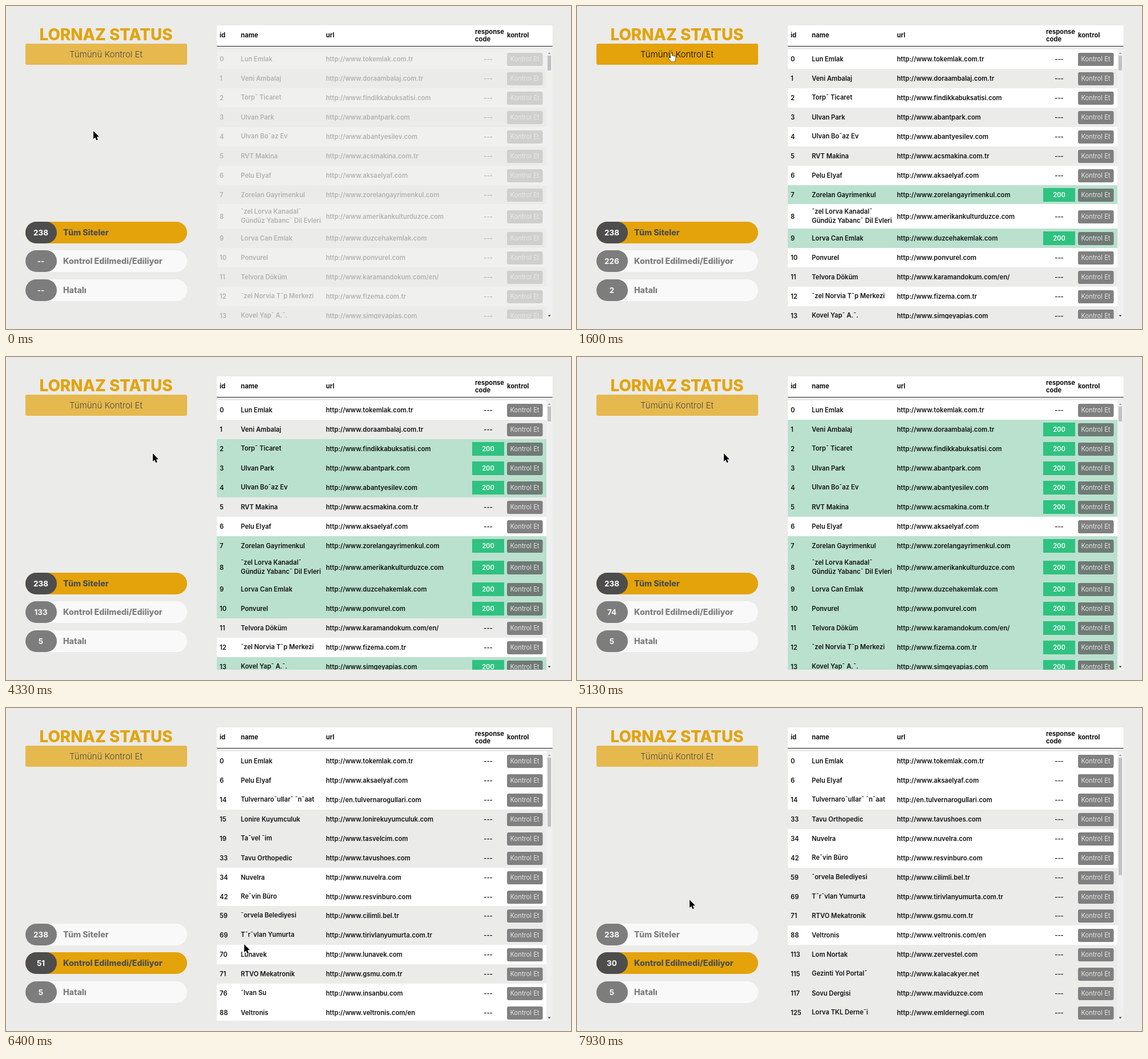
Write an HTML page with a canvas that moves like this. It is 989 px wide and 566 px high and loops after 8 s.

```html
<!DOCTYPE html>
<html lang="tr">
<head>
<meta charset="utf-8">
<title>Status</title>
<style>
  html, body { margin: 0; height: 100%; overflow: hidden; background: #ebebea; }
  canvas { display: block; }
</style>
</head>
<body>
<canvas id="stage" width="989" height="566"></canvas>
<script>
const ctx = document.getElementById('stage').getContext('2d');
const BG = '#ebebea', GOLD = '#e4a30a', DARK = '#4d4d4d';
const LOOP = 8000, FPS = 15, START_AT = 1330, FILTER_AT = 5800;
const TOTAL = 238, ROW = 33.9, TALL_ROW = 42.5;

// id | name | address
const sites = `0|Lun Emlak|www.tokemlak.com.tr
1|Veni Ambalaj|www.doraambalaj.com.tr
2|Torp¯ Ticaret|www.findikkabuksatisi.com
3|Ulvan Park|www.abantpark.com
4|Ulvan Bo¯az Ev|www.abantyesilev.com
5|RVT Makina|www.acsmakina.com.tr
6|Pelu Elyaf|www.aksaelyaf.com
7|Zorelan Gayrimenkul|www.zorelangayrimenkul.com
8|¯zel Lorva Kanadal¯/Gündüz Yabanc¯ Dil Evleri|www.amerikankulturduzce.com
9|Lorva Can Emlak|www.duzcehakemlak.com
10|Ponvurel|www.ponvurel.com
11|Telvora Döküm|www.karamandokum.com/en/
12|¯zel Norvia T¯p Merkezi|www.fizema.com.tr
13|Kovel Yap¯ A.¯.|www.simgeyapias.com
14|Tulvernaro¯ullar¯ ¯n¯aat|en.tulvernarogullari.com
15|Lonire Kuyumculuk|www.lonirekuyumculuk.com
19|Ta¯vel ¯im|www.tasvelcim.com
33|Tavu Orthopedic|www.tavushoes.com
34|Nuvelra|www.nuvelra.com
42|Re¯vin Büro|www.resvinburo.com
59|¯orvela Belediyesi|www.cilimli.bel.tr
69|T¯r¯vlan Yumurta|www.tirivlanyumurta.com.tr
70|Lunavek|www.lunavek.com
71|RTVO Mekatronik|www.gsmu.com.tr
76|¯lvan Su|www.insanbu.com
88|Veltronis|www.veltronis.com/en
113|Lom Nortak|www.zervestel.com
114|Lorva OSB|www.duzceosb.org.tr
115|Gezinti Yol Portal¯|www.kalacakyer.net
117|Sovu Dergisi|www.maviduzce.com
125|Lorva TKL Derne¯i|www.emldernegi.com`.split('\n').map(line => {
  const [id, name, url] = line.split('|');
  return { id: +id, lines: name.split('/'), url: 'http://' + url, limit: 0 };
});

// A site is done once the waiting counter has dropped to its limit.
const finishInOrder = (ids, first, gap) =>
  ids.forEach((id, k) => { sites.find(site => site.id === id).limit = first - gap * k; });
finishInOrder([7, 9, 2, 10, 13, 3, 4, 8, 1, 5, 12, 11], 240, 14);
finishInOrder([70, 76, 114, 15, 19], 50, 3.5);

// time, sites still waiting
const progress = [
  [START_AT, TOTAL], [1600, 226], [2270, 226], [2800, 178], [3470, 176], [3740, 176],
  [5130, 74], [5930, 53], [6400, 51], [6800, 44], [7130, 36], [LOOP, 28.5]
];
// from time, to time, x, y
const moves = [
  [0, 0, 153, 219], [200, 870, 165, 82], [2210, 2800, 257, 169], [5210, 5730, 228, 442],
  [6210, 6400, 417, 414], [6400, 6800, 493, 370], [7070, 7600, 197, 336]
];

const arrow = new Path2D('M0 0V14L3.2 11.2 5.3 16.2 7.8 15.2 5.7 10.3H10Z');
const hand = new Path2D('M4.2 9V1.6a1.2 1.2 0 0 1 2.4 0V6a1 1 0 0 1 2.2.2a1 1 0 0 1 2.1.5' +
  'a1 1 0 0 1 2 .6V11L11.5 15.5H5.5L1.2 10.6a1.1 1.1 0 0 1 1.6-1.4Z');
const beam = new Path2D('M-3-5.5H-1L0-4.5 1-5.5H3M0-4.5V5.5M-3 6.5H-1L0 5.5 1 6.5H3');

const clamp = u => Math.min(1, Math.max(0, u));
const smooth = u => u * u * (3 - 2 * u);
const mix = (a, b, u) => a + (b - a) * u;

function waitingAt(t) {
  const next = progress.findIndex(key => key[0] > t);
  if (next === 0) return TOTAL;
  const [[t0, n0], [t1, n1]] = progress.slice(next - 1, next + 1);
  return mix(n0, n1, (t - t0) / (t1 - t0));
}

function pointerAt(t) {
  let pos = [0, 0];
  for (const [from, to, x, y] of moves) {
    if (t < from) break;
    const u = smooth(clamp((t - from) / (to - from || 1) + (to === from)));
    pos = [mix(pos[0], x, u), mix(pos[1], y, u)];
  }
  return pos;
}

function box(x, y, w, h, color, radius = 0) {
  ctx.fillStyle = color;
  ctx.beginPath();
  ctx.roundRect(x, y, w, h, radius);
  ctx.fill();
}

function text(str, x, y, size, weight, color, align = 'left') {
  ctx.font = `${weight} ${size}px Inter, sans-serif`;
  ctx.fillStyle = color;
  ctx.textAlign = align;
  ctx.fillText(str, x, y);
}

// Fades what lies in the area towards the page colour.
function veil(x, y, w, h, amount) {
  ctx.globalAlpha = amount;
  box(x, y, w, h, BG);
  ctx.globalAlpha = 1;
}

const over = ([px, py], x, y, w, h) => px >= x && px < x + w && py >= y && py < y + h;
const pillTop = i => Math.round(378 + 50.4 * i);

function drawButton(pointer) {
  const area = [34, 66, 283, 37];
  box(...area, GOLD, 3);
  text('Tümünü Kontrol Et', 175, 90, 15, 300, '#000', 'center');
  if (!over(pointer, ...area)) veil(...area, 0.3);
}

function drawPill(i, count, label, active, pointer) {
  const area = [34, pillTop(i), 283, 38];
  const baseline = area[1] + 24;
  box(...area, active ? GOLD : '#fff', 19);
  box(34, area[1], 55, 38, DARK, 19);
  text(count, 61, baseline, 13.5, 700, '#fff', 'center');
  text(label, 100, baseline, 14.2, 800, DARK);
  if (!active && !over(pointer, ...area)) veil(...area, 0.3);
}

function drawHeader() {
  box(369, 34, 587.5, 36.5, '#fff');
  box(369, 70, 587.5, 1, '#222');
  const label = (str, x, y) => text(str, x, y, 11.2, 700, '#111');
  label('id', 374, 55);
  label('name', 411, 55);
  label('url', 560, 55);
  label('response', 821, 49);
  label('code', 821, 62);
  label('kontrol', 877, 55);
}

function drawRow({ id, lines, url }, top, height, done) {
  const mid = Math.round(top + height / 2);
  const edge = Math.round(top);
  const cell = (str, x, y, color = '#111', align) => text(str, x, y, 11.2, 600, color, align);
  box(369, edge, 577, Math.round(top + height) - edge, done ? '#b9e1ce' : id % 2 ? BG : '#fff');
  cell(id, 374, mid + 4);
  lines.forEach((line, i) => {
    const lift = line.includes('¯') ? 1 : 0;
    cell(line, 411, mid + 4 - lift + (i - (lines.length - 1) / 2) * 16);
  });
  cell(url, 560, mid + 4);
  if (done) box(816, mid - 12, 56, 24, '#2fc281');
  cell(done ? '200' : '---', 844, mid + 4, done ? '#fff' : '#111', 'center');
  box(877, mid - 11, 62.5, 23, done ? '#6f7a75' : '#808081', 3);
  text('Kontrol Et', 908, mid + 4, 11.2, 400, '#e6e6e6', 'center');
}

function drawTable(t, waiting) {
  const filtered = t >= FILTER_AT;
  ctx.save();
  ctx.beginPath();
  ctx.rect(369, 76, 588, 472);
  ctx.clip();
  let top = 76.3;
  for (const site of sites) {
    const done = t > START_AT && waiting <= site.limit;
    if (top > 548) break;
    if (filtered && done) continue;
    const height = site.lines.length > 1 ? TALL_ROW : ROW;
    drawRow(site, top, height, done);
    top += height;
  }
  veil(369, 76, 577, 472, 0.74 * clamp((START_AT + 140 - t) / 200));
  ctx.restore();

  box(946, 76, 10.5, 472, '#f0f0f0');
  box(948, 87, 6, 6170 / (filtered ? Math.ceil(waiting) : TOTAL), '#c1c1c1');
  const tip = (y, dir, color) => {
    ctx.fillStyle = color;
    ctx.fill(new Path2D(`M948.5 ${y}h5l-2.5 ${3 * dir}z`));
  };
  tip(84, -1, '#a3a3a3');
  tip(541.5, 1, '#404040');
}

function paint(shape, fill, line, width) {
  ctx.strokeStyle = line;
  ctx.lineWidth = width;
  ctx.stroke(shape);
  if (fill) {
    ctx.fillStyle = fill;
    ctx.fill(shape);
  }
}

function drawPointer([x, y]) {
  const onControl = over([x, y], 34, 66, 283, 37) ||
    [0, 1, 2].some(i => over([x, y], 34, pillTop(i), 283, 38));
  ctx.save();
  ctx.lineJoin = 'round';
  if (onControl) {
    ctx.translate(x - 5.4, y);
    paint(hand, '#fff', '#000', 1.1);
  } else if (x > 440) {
    ctx.translate(x + 0.5, y + 0.5);
    paint(beam, null, '#fff', 2.4);
    paint(beam, null, '#000', 1);
  } else {
    ctx.translate(x, y);
    paint(arrow, '#000', '#fff', 1.6);
  }
  ctx.restore();
}

function draw(t) {
  const waiting = waitingAt(t);
  const count = Math.ceil(waiting);
  const failed = Math.min(5, Math.ceil((TOTAL - count) / 10));
  const pointer = pointerAt(t);
  const filtered = t >= FILTER_AT;
  const shown = n => t < START_AT ? '--' : n;
  box(0, 0, 989, 566, BG);
  text('LORNAZ STATUS', 175, 60, 27.8, 800, GOLD, 'center');
  drawButton(pointer);
  drawPill(0, TOTAL, 'Tüm Siteler', !filtered, pointer);
  drawPill(1, shown(count), 'Kontrol Edilmedi/Ediliyor', filtered, pointer);
  drawPill(2, shown(failed), 'Hatalı', false, pointer);
  drawHeader();
  drawTable(t, waiting);
  drawPointer(pointer);
}

function tick() {
  const step = Math.floor((performance.now() % LOOP) * FPS / 1000 + 0.1);
  draw(Math.round(step * 100 / FPS) * 10 % LOOP);
  requestAnimationFrame(tick);
}
tick();
</script>
</body>
</html>
```
